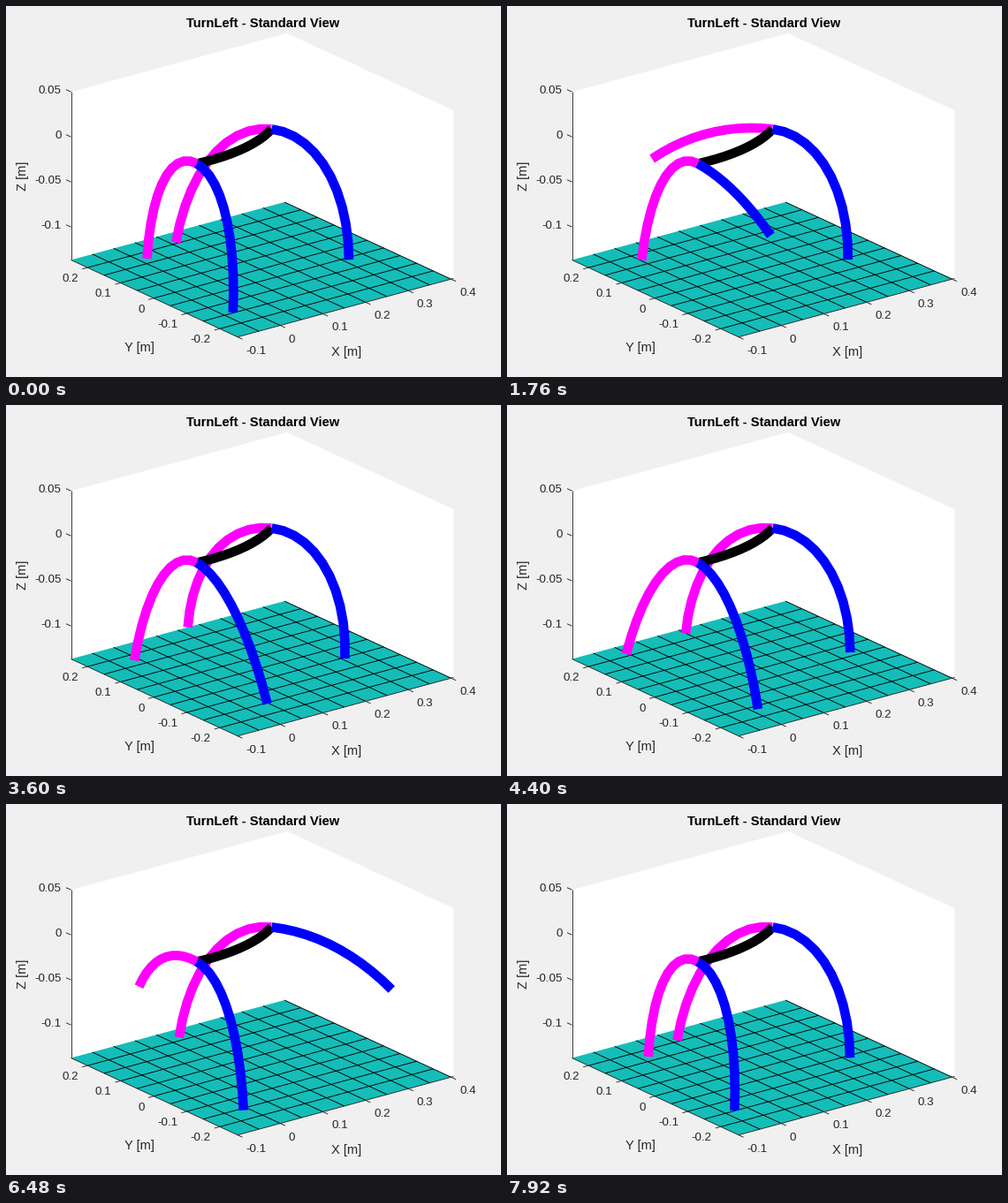
A matplotlib script for the animation above (8000 ms loop, 560 by 420 pixels).

```python
import numpy as np
import matplotlib.pyplot as plt
from matplotlib.animation import FuncAnimation

W, H, DPI = 560, 420, 100
FRAMES, INTERVAL = 100, 80
PT = 72 / DPI  # points per pixel

INK = "#262626"
FLOOR = "#15bdb8"
MAGENTA, BLUE, BLACK = "#ff00ff", "#0000ff", "#000000"

# Pixels per metre along each world axis
X_AXIS = np.array([483.0, -131.0])
Y_AXIS = np.array([-374.0, -173.0])
DOWN = np.array([0.0, 1020.0])
CORNER = np.array([73.0, 287.0])  # x = -0.1, y = 0.25 on the floor
X_END, Y_END = 0.406, -0.254

LEG, BODY = 0.25, 0.233  # limb lengths in metres
FRONT_YAW, REAR_YAW = np.radians(-5), np.radians(35)

SWING = 48   # frames a foot spends in the air
LIFT = 0.86  # bend released at the top of a step


def floor_point(x, y):
    return CORNER + (x + 0.1) * X_AXIS + (y - 0.25) * Y_AXIS


def heading(yaw):
    return np.cos(yaw) * X_AXIS + np.sin(yaw) * Y_AXIS


def leftward(yaw):
    return heading(yaw + np.pi / 2)


def arc(base, along, bend, length):
    """Constant-curvature limb; bend is its total turn as a projected vector and angle."""
    toward, angle = bend
    u = np.linspace(0, 1, 12)[:, None] * angle
    return base + length / angle * (along * np.sin(u) + toward * (1 - np.cos(u)))


def gait(i, start, curl, back, front, sway):
    """Downward and forward bend of a leg whose step begins at frame start."""
    t = (i - start) % FRAMES
    if t >= SWING:
        s = (t - SWING) / (FRAMES - SWING)
        return curl, front + (back - front) * s
    w = t / SWING
    ease = w * w * (3 - 2 * w)
    forward = (back + (front - back) * ease
               + sway * np.sin(np.pi * w) - 0.22 * np.sin(2 * np.pi * w))
    return curl - LIFT * np.sin(np.pi * w)**2, forward


def leg_shape(i, base, yaw, side, step):
    down, forward = gait(i, *step)
    angle = np.hypot(down, forward)
    toward = (down * DOWN + forward * heading(yaw)) / angle
    return arc(base, side * leftward(yaw), (toward, angle), LEG)


fig = plt.figure(figsize=(W / DPI, H / DPI), dpi=DPI, facecolor="#f0f0f0")
ax = fig.add_axes([0, 0, 1, 1])
ax.set_xlim(-0.5, W - 0.5)
ax.set_ylim(H - 0.5, -0.5)
ax.axis("off")


def thick_line(points, color, z):
    return ax.plot(*points.T, color=color, lw=10.67 * PT, zorder=z,
                   solid_capstyle="butt", solid_joinstyle="miter")[0]


def thin_line(a, b, color=INK):
    ax.plot(*zip(a, b), color=color, lw=0.9 * PT, zorder=3,
            solid_capstyle="butt")


def label(pos, text, size=13.33, ha="center", **style):
    style = {"color": INK, **style}
    ax.text(*pos, text, fontsize=size * PT, ha=ha, va="center",
            family="Liberation Sans", **style)


def fill(points, color, z):
    ax.fill(*np.array(points).T, color=color, lw=0, zorder=z)


def draw_scene():
    left, front = floor_point(-0.1, 0.25), floor_point(-0.1, Y_END)
    back, right = floor_point(X_END, 0.25), floor_point(X_END, Y_END)
    up = np.array([0, -190.3])
    fill([left, left + up, back + up, right + up, right, front], "white", 1)
    fill([left, floor_point(0.4, 0.25), floor_point(0.4, Y_END), front], FLOOR, 2)

    for x in np.arange(1, 11) * 0.05 - 0.1:
        thin_line(floor_point(x, 0.25), floor_point(x, Y_END), BLACK)
    for y in np.arange(1, 10) * 0.05 - 0.25:
        thin_line(floor_point(-0.1, y), floor_point(0.4, y), BLACK)
    thin_line(left, left + up)
    thin_line(left, front)
    thin_line(front, right)

    x_out, y_out = np.array([-6.0, 1.6]), np.array([5.5, 2.5])
    for n in range(-1, 5):
        tick = floor_point(n / 10, Y_END)
        thin_line(tick, tick + y_out)
        label(tick + (9.7, 16), f"{n / 10:g}", ha="left")
    for n in range(-2, 3):
        tick = floor_point(-0.1, n / 10)
        thin_line(tick, tick + x_out)
        label(tick + (-10.3, 13), f"{n / 10:g}", ha="right")
    for n in range(-2, 2):
        tick = left + up + (1 - n) * 0.05 * DOWN
        thin_line(tick, tick - y_out)
        label(tick + (-11, -1.5), f"{n / 20:g}", ha="right")

    label((385, 391.5), "X [m]", 14.67)
    label((150, 386.5), "Y [m]", 14.67)
    label((18, 192), "Z [m]", 14.67, rotation=90)
    label((290, 19.4), "TurnLeft - Standard View", 14.75,
          color="black", weight="bold")


draw_scene()

front_hub = np.array([215.5, 178.0])
body = arc(front_hub, heading(FRONT_YAW),
           (leftward(FRONT_YAW), REAR_YAW - FRONT_YAW), BODY)
rear_hub = body[-1]
thick_line(body, BLACK, 5)

# Each step: start frame, curl, rearmost and foremost bend, sway in the air
legs = [
    (rear_hub, REAR_YAW, 1, (0, 1.28, 0.05, 0.45, 0.02)),
    (rear_hub, REAR_YAW, -1, (50, 1.08, -0.95, -0.85, 0.53)),
    (front_hub, FRONT_YAW, 1, (50, 1.29, -0.20, 0.10, 0.00)),
    (front_hub, FRONT_YAW, -1, (0, 1.13, -0.41, 0.10, 0.26)),
]
lines = [thick_line(leg_shape(0, *leg), color, z)
         for leg, color, z in zip(legs, [MAGENTA, BLUE] * 2, (4, 6, 7, 8))]


def draw(i):
    for line, leg in zip(lines, legs):
        line.set_data(*leg_shape(i, *leg).T)
    return lines


anim = FuncAnimation(fig, draw, frames=FRAMES, interval=INTERVAL,
                     repeat=True, repeat_delay=0)
plt.show()
```
